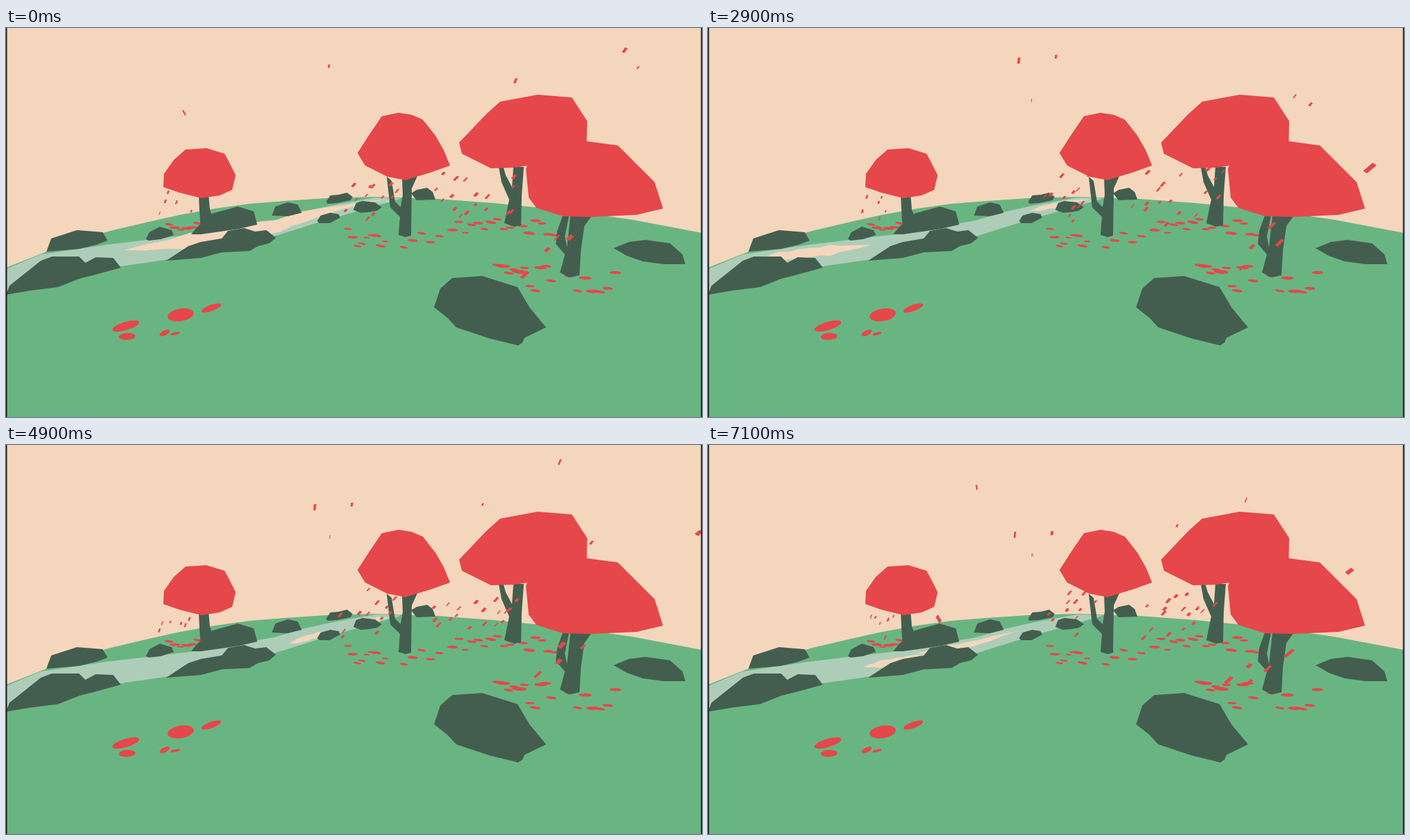
These frames come from a looping animation (1000 by 560 pixels, 7200 ms). An HTML page with a canvas:

```html
<!DOCTYPE html>
<html lang="en">
<head>
<meta charset="utf-8">
<title>Autumn hill</title>
<style>
html, body { margin: 0; width: 100%; height: 100%; overflow: hidden; background: #f4d6bc; }
canvas { display: block; width: 1000px; height: 560px; }
</style>
</head>
<body>
<canvas id="stage" width="1000" height="560"></canvas>
<script>
const ctx = document.getElementById('stage').getContext('2d');
const LOOP = 7200, STEP = 100;
const SKY = '#f4d6bc', GRASS = '#69b582', DARK = '#435e4f', RED = '#e5474a', WATER = '#aecdb9';

const poly = pts => new Path2D('M' + pts + 'Z');
const mix = (a, b, u) => a + (b - a) * u;
const clamp = (v, lo, hi) => Math.max(lo, Math.min(hi, v));
const rnd = k => { const v = Math.sin(k * 127.1 + 3.7) * 43758.5453; return v - Math.floor(v); };

const hill = poly('0,345 58,322 100,306 150,292 205,279 250,269 300,260 350,253 400,249 460,245 530,243 620,246 700,252 800,262 900,276 1000,295 1000,560 0,560');

const rocks = [
  '58,322 65,303 102,291 139,294 146,306 130,312 105,318',
  '0,384 5,371 50,335 66,329 105,329 114,338 129,330 154,331 165,345 125,356 105,361 75,373 35,378',
  '201,304 206,294 221,286 238,291 241,298 223,304 205,306',
  '266,297 275,286 297,267 333,257 356,264 361,283 335,289 315,292 280,297',
  '230,335 262,314 280,308 310,303 319,292 342,288 358,293 374,291 388,302 378,310 362,314 350,321 310,323 280,331',
  '382,270 387,257 405,251 419,254 425,266 405,271',
  '460,250 466,241 478,240 490,237 498,243 495,248 475,252 462,253',
  '447,278 452,270 466,266 478,268 480,273 465,281 450,281',
  '499,262 503,252 512,249 530,251 540,258 533,263 522,265 510,266',
  '582,238 590,233 605,230 613,236 617,247 590,248',
  '873,317 895,308 919,305 954,310 972,326 976,340 945,340 915,336 892,328',
  '615,402 624,375 641,360 684,357 735,373 752,402 776,431 745,446 742,453 736,457 695,447 647,431 634,417'
].map(poly);

const trunks = [
  '277,240 291,240 293,262 298,274 299,290 280,292 278,265',
  '547,214 554,220 559,250 567,258 570,240 569,215 592,211 583,231 582,299 574,301 564,298 566,272 552,258',
  '729,200 744,200 741,240 740,284 730,286 716,281 723,247 712,222 707,195 714,198 718,212 727,229',
  '800,270 809,270 803,300 806,316 811,270 842,270 831,285 826,320 824,356 809,359 796,352 803,326 790,311 792,292'
].map(poly);

const crowns = [
  '226,229 227,210 241,190 258,175 288,173 314,181 320,192 330,212 325,233 307,241 281,245 249,237',
  '505,180 523,152 540,127 564,122 583,125 599,132 617,155 629,176 638,198 610,208 590,214 574,219 548,214 516,198',
  '651,165 690,124 710,106 764,96 813,100 835,134 834,185 750,198 730,201 697,202 655,181',
  '747,203 750,195 800,160 834,163 879,169 932,222 944,260 906,269 840,272 800,271 762,259 751,244'
].map(poly);

const bankTop = [[0, 347], [50, 326], [145, 312], [270, 297], [385, 277], [425, 265], [470, 255], [530, 244], [566, 245]];
const bankLow = [[0, 380], [100, 350], [165, 343], [235, 333], [310, 315], [388, 299], [445, 281], [500, 265], [566, 246]];
const river = poly([...bankTop, ...bankLow.slice().reverse()].join(' '));

// Bright streaks on the water: birth s, length s, lane, half width
const streaks = [
  [-2.1, 2, .32, .36], [-1.3, .25, .62, .2], [-.1, .15, .75, .2], [.4, .65, .35, .25], [2.1, 1.2, .35, .2],
  [3.8, .4, .68, .18], [4.4, .7, .6, .26], [5.2, .4, .52, .16], [5.5, .7, .36, .16]
];

// Large leaves in the foreground: x, y, half length, half thickness, tilt
const nearLitter = [
  [172, 429, 20, 6, -17], [174, 444, 12, 5, -3], [251, 413, 19, 9, -10],
  [295, 403, 15, 4.5, -20], [228, 439, 8, 3.5, -25], [243, 440, 7, 2, -12]
];
// Scattered leaves below each tree
const litter = [
  { x: 255, y: 287, w: 25, h: 6, n: 6, size: 7 },
  { x: 518, y: 303, w: 30, h: 14, n: 9, size: 7 },
  { x: 597, y: 306, w: 32, h: 11, n: 5, size: 7 },
  { x: 715, y: 286, w: 78, h: 13, n: 17, size: 8 },
  { x: 745, y: 362, w: 42, h: 24, n: 11, size: 10 },
  { x: 843, y: 372, w: 38, h: 20, n: 7, size: 10 }
];

// Leaves crossing the sky: entry s, x, y, speed x, speed y, length
const sky = [
  [0, 464, 55, .3, 18.5, 6], [0, 256, 122, 13.5, 23, 11], [0, 889, 32, -17.4, 25, 9], [0, 908, 57, -16, 20, 7],
  [0, 732, 76, -8, 20, 8], [.9, 450, -2, -1.8, 26, 9], [1.1, 503, -4, -1.8, 26.6, 9], [1.3, 1005, 156, -35.5, 30, 18],
  [3.1, 695, 57, -6, 16.8, 6], [3.9, 807, -3, -11.8, 28.4, 9], [4.8, 999, 124, -36, 27, 13], [5.7, 377, 0, 6.7, 45.5, 10]
];
// Leaves shed by each tree, reborn after every life
const flocks = [
  { n: 6, x: 228, y: 230, w: 45, h: 20, vx: -4, vy: 12, life: 2.6, len: 6 },
  { n: 12, x: 508, y: 200, w: 66, h: 42, vx: -14, vy: 16, life: 2.6, len: 8 },
  { n: 18, x: 632, y: 198, w: 125, h: 55, vx: -16, vy: 17, life: 2.2, len: 8.5 },
  { n: 4, x: 800, y: 274, w: 42, h: 24, vx: -23, vy: 23, life: 2.6, len: 13 }
];

function heightAt(line, x) {
  const i = Math.max(1, line.findIndex(p => p[0] >= x));
  const [a, b] = [line[i - 1], line[i]];
  return mix(a[1], b[1], (x - a[0]) / (b[0] - a[0]));
}

function fill(color, paths) {
  ctx.fillStyle = color;
  for (const p of paths) ctx.fill(p);
}

// The stream speeds up as it nears the viewer
const flowX = age => clamp(550 - 125 * Math.max(0, age) ** 1.5, 0, 550);

function drawStreak([born, length, lane, half], t) {
  const age = t - born;
  const width = half * clamp((2.7 - age) * 4, 0, 1);
  const left = flowX(age), right = flowX(age - length);
  if (!width || right - left < 2) return;
  const upper = [], lower = [], n = 12;
  for (let i = 0; i <= n; i++) {
    const x = mix(left, right, i / n);
    const w = width * Math.min(1, i / 3, (n - i) / 4) * (1 + .2 * Math.sin(i * 2.4 + age * 3));
    const top = heightAt(bankTop, x), low = heightAt(bankLow, x);
    upper.push([x, mix(top, low, lane - w)]);
    lower.unshift([x, mix(top, low, lane + w)]);
  }
  ctx.fill(poly(upper.concat(lower).join(' ')));
}

function ellipse(x, y, rx, ry, tilt) {
  ctx.beginPath();
  ctx.ellipse(x, y, rx, ry, tilt * Math.PI / 180, 0, 7);
  ctx.fill();
}

function scatter({ x, y, w, h, n, size }, k) {
  for (let i = 0; i < n; i++) {
    const s = k * 50 + i, r = size * mix(.6, 1.1, rnd(s + .3));
    ellipse(x + w * ((2 * i + 1) / n - 1), y + h * (2 * rnd(s) - 1), r, r * .25, mix(0, 10, rnd(s + .6)));
  }
}

function drawLeaf(x, y, vx, vy, len, spin) {
  const l = len * (.8 + .2 * Math.sin(spin * 2));
  const w = len * .45 * (.35 + .65 * Math.abs(Math.cos(spin)));
  ctx.save();
  ctx.translate(x, y);
  ctx.rotate(Math.atan2(vy, vx));
  ctx.transform(1, 0, .3, 1, 0, 0);
  ctx.fillRect(-l / 2, -w / 2, l, w);
  ctx.restore();
}

function drawSkyLeaf([born, x, y, vx, vy, len], t, i) {
  const age = t - born;
  if (age < 0) return;
  const d = age * (1 - .03 * age);
  drawLeaf(x + vx * d, y + vy * d, vx, vy, len, i * 1.7 + t * 1.6);
}

function drawFlock({ n, x, y, w, h, vx, vy, life, len }, t, k) {
  for (let i = 0; i < n; i++) {
    const turns = t / life + rnd(k * 40 + i), cycle = Math.floor(turns);
    const age = (turns - cycle) * life, s = k * 90 + i * 4 + cycle;
    drawLeaf(x + w * rnd(s) + vx * age, y + h * rnd(s + .5) + vy * age, vx, vy, len, s + t * 1.6);
  }
}

function draw(t) {
  ctx.fillStyle = SKY;
  ctx.fillRect(0, 0, 1000, 560);
  fill(GRASS, [hill]);
  fill(WATER, [river]);
  ctx.fillStyle = SKY;
  streaks.forEach(s => drawStreak(s, t));
  fill(DARK, rocks);

  ctx.fillStyle = RED;
  nearLitter.forEach(leaf => ellipse(...leaf));
  litter.forEach(scatter);
  fill(DARK, trunks);
  fill(RED, crowns);
  sky.forEach((leaf, i) => drawSkyLeaf(leaf, t, i));
  flocks.forEach((flock, k) => drawFlock(flock, t, k));

  ctx.fillStyle = '#1c1a19';
  ctx.fillRect(0, 0, 1.5, 560);
  ctx.fillRect(998.5, 0, 1.5, 560);
}

const start = performance.now();
function tick() {
  const ms = (performance.now() - start) % LOOP;
  draw(Math.floor(ms / STEP) * STEP / 1000);
  requestAnimationFrame(tick);
}
tick();
</script>
</body>
</html>
```
